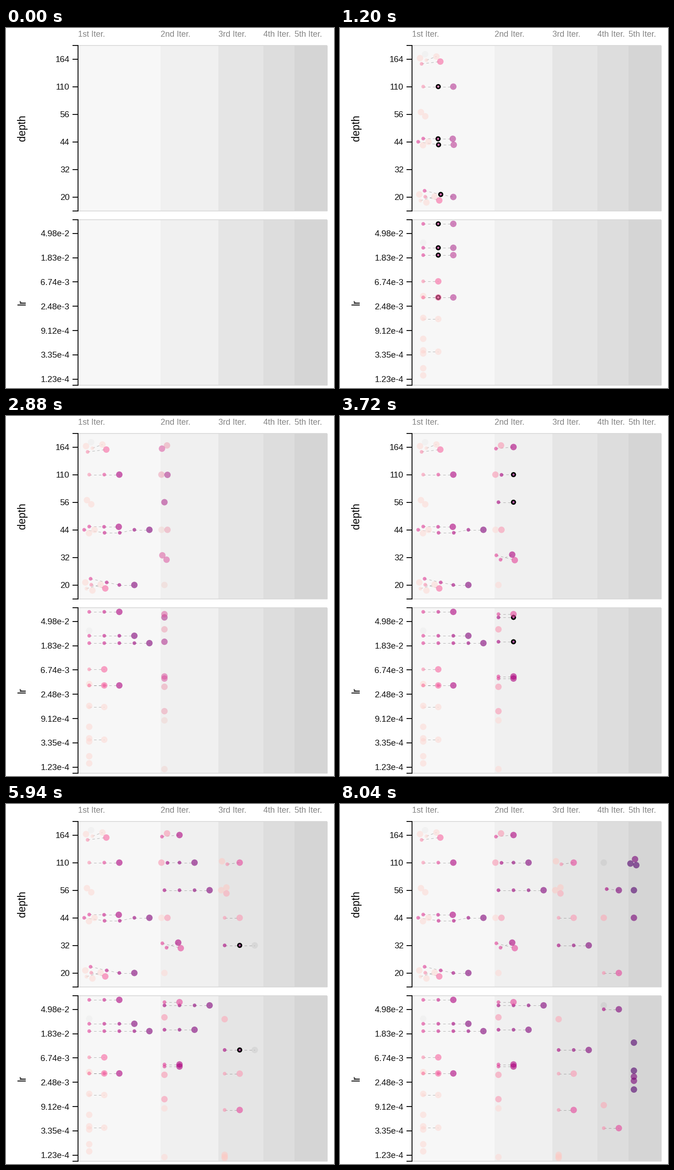
Animation, 715 px wide and 783 px high, one loop 8.22 s. Source, as a matplotlib script:

```python
import numpy as np
import matplotlib.pyplot as plt
from matplotlib.animation import FuncAnimation
from matplotlib.collections import LineCollection

W, H, DPI = 715, 783, 64
PT = 72 / DPI                      # points per pixel
STEP_MS, FRAMES = 60, 137
RUNG = 32.8                        # distance between two rungs
BIG, SMALL = 7, 4

DEPTHS = "164 110 56 44 32 20".split()
RATES = "4.98e-2 1.83e-2 6.74e-3 2.48e-3 9.12e-4 3.35e-4 1.23e-4".split()
ROW = {name: 67.5 + 60 * i for i, name in enumerate(DEPTHS)}

# Score on the first and on the last rung.
GHOST, FAINT, DIM, SOFT = (0, 0), (1.2, 1.2), (1.8, 1.8), (2.7, 2.7)
LIGHT, PALE, WARM, RISE = (3.1, 3.1), (3.3, 4), (3.3, 4.7), (3.2, 6)
ROSE, PINK, HOT = (4.7, 4.7), (4.8, 6), (4.8, 6.9)
PLUM, GRAPE, DARK = (6.1, 6.9), (7, 7), (7.8, 7.8)

cmap = plt.get_cmap("RdPu")
dots, links = [], []


def ease(u):
    u = min(max(u, 0), 1)
    return 4 * u**3 if u < .5 else 1 - 4 * (1 - u)**3


def iteration(base, *times):
    """Return a function that adds one trial to both panels."""
    late = base > 400
    grey = np.array([.67, .67, .67, .22 if late else .08])

    def shade(level):
        return np.array(cmap(level / 8)[:3] + (.6,)) if level else grey

    def chain(points, levels):
        for k, (pos, level) in enumerate(zip(points, levels)):
            after = times[k + 1] if k + 1 < len(points) else None
            dots.append((pos, times[k], after, grey, shade(level)))
            if k:
                links.append((points[k - 1], pos, times[k]))

    def trial(depth, tone, rungs, rate_y, *shifts):
        levels = np.linspace(*tone, rungs)
        xs = base + RUNG * np.arange(rungs)
        shifts += ((0, 0),) * (rungs - len(shifts))
        chain([(x + dx, ROW[depth] + dy) for x, (dx, dy) in zip(xs, shifts)],
              levels)
        chain([(x, rate_y) for x in xs], levels)

    return trial


add = iteration(181.4, 120, 600, 1080, 1680, 2160)
add("164", FAINT, 1, 583, (-7, -2))
add("164", GHOST, 1, 467, (4, -10.5))
add("164", FAINT, 2, 633, (7, 2.5), (-4, -5.5))
add("164", PALE, 2, 551, (-3.5, 10.5), (4.5, 5.5))
add("110", RISE, 3, 586)
add("56", FAINT, 1, 630.5, (-5, -4.5))
add("56", FAINT, 1, 676, (4.5, 4.5))
add("44", PINK, 3, 426, (0, -7), (-.4, -6.5), (-1.2, -6.5))
add("44", HOT, 5, 494, (-11, 0), (.6, 6.5), (1, 6.5))
add("44", FAINT, 1, 701, (11.5, 0))
add("44", FAINT, 1, 708, (-.5, 7.5))
add("20", HOT, 4, 478, (3, -13.5), (5.4, -5.5))
add("20", FAINT, 1, 740, (-8.5, -5.5))
add("20", FAINT, 2, 704, (-6, 8), (-8, -1))
add("20", PALE, 2, 586, (4.5, -.5), (2.2, 7.5))
add("20", FAINT, 1, 755.5, (7, 12))

add = iteration(345.4, 2760, 3240, 3840, 4380)
add("164", LIGHT, 1, 464, (5.6, -3.5))
add("164", PINK, 2, 566.5, (-5.4, 3.5))
add("110", LIGHT, 1, 589, (-6.6, 0))
add("110", PLUM, 3, 491, (6.6, .5))
add("56", PLUM, 4, 438)
add("44", FAINT, 1, 662, (-6.4, 0))
add("44", LIGHT, 1, 642, (6.6, 0))
add("32", ROSE, 2, 431, (-4.6, -4.5), (2.8, 6))
add("32", PINK, 2, 571, (4.6, 5), (-2.8, -6))
add("20", FAINT, 1, 768)

add = iteration(476.6, 4920, 5400, 5940)
add("110", DIM, 1, 763, (-5.8, -3))
add("110", WARM, 2, 665.5, (5.8, 3.5))
add("56", DIM, 1, 767, (4, -6))
add("56", DIM, 1, 770, (-7.5, 0))
add("56", SOFT, 1, 468, (4, 7))
add("44", LIGHT, 2, 586.5)
add("32", PLUM, 3, 535)

add = iteration(575, 6540, 7080)
add("110", GHOST, 1, 438)
add("56", PLUM, 2, 446.5, (6.4, -2.5))
add("44", SOFT, 1, 655)
add("20", WARM, 2, 705)

add = iteration(640.7, 7620)
add("110", GRAPE, 1, 593, (2.4, -7.5))
add("110", DARK, 1, 519, (-7.6, 2))
add("110", DARK, 1, 580, (5.2, 5.5))
add("56", DARK, 1, 621)
add("44", GRAPE, 1, 602)

plt.rcParams["font.family"] = "Liberation Sans"
fig = plt.figure(figsize=(W / DPI, H / DPI), dpi=DPI, facecolor="white")
ax = fig.add_axes([0, 0, 1, 1])
ax.set(xlim=(0, W), ylim=(H, 0))
ax.axis("off")

EDGES = [157, 337, 463, 561, 629, 700]


def line(xs, ys, color, width):
    ax.plot(xs, ys, color=color, lw=width * PT, zorder=2,
            solid_capstyle="butt")


def text(x, y, s, size, **kw):
    ax.text(x, y, s, fontsize=size * PT, va="baseline", **kw)


def panel(top, bottom, ticks, title):
    for x0, x1, g in zip(EDGES, EDGES[1:], (247, 240, 229, 221, 213)):
        ax.fill_between([x0, x1], top, bottom, color=[g / 255] * 3, lw=0,
                        zorder=1)
    for y in (top, bottom):
        line([157, 700], [y, y], "#d6d6d6", 1.6)
    line([700, 700], [top, bottom], "#d6d6d6", 1.2)
    line([156.5, 156.5], [top - 1, bottom + 1], "#111111", 2)
    for y in [top, bottom, *ticks.values()]:
        line([144.5, 157], [y, y], "#111111", 2)
    for label, y in ticks.items():
        text(138.5, y + 6.5, label, 18.6, ha="right", color="#111111")
    text(42, (top + bottom) / 2 - .5, title, 22.8, ha="center",
         rotation=90, rotation_mode="anchor", color="black")


panel(38, 398, ROW, "depth")
panel(417, 777, {s: 446.7 + 52.85 * i for i, s in enumerate(RATES)}, "lr")
for x, name in zip(EDGES, "1st 2nd 3rd 4th 5th".split()):
    text(x, 18.7, name + " Iter.", 18, color="#858585")

link_art = LineCollection([[p, q] for p, q, _ in links], linewidths=PT,
                          linestyles=[(0, (5.5, 5))], zorder=3)
ax.add_collection(link_art)
dot_art = ax.scatter(*zip(*[d[0] for d in dots]), s=1, zorder=4)


def dot_state(t, start, after, first, last):
    """Face colour, radius and ring strength of a dot at time t."""
    if t < start:
        return np.zeros(4), 0, 0
    face = first + (last - first) * ease((t - start) / 180)
    if after is None:
        return face, BIG, 0
    chosen = ease((t - after + 300) / 120)
    ring = chosen * (1 - ease((t - after - 120) / 120))
    return face, BIG + (SMALL - BIG) * chosen, ring


def draw(i):
    t = i * STEP_MS
    faces, radii, rings = zip(*[dot_state(t, *d[1:]) for d in dots])
    dot_art.set_facecolor(np.array(faces))
    dot_art.set_edgecolor([(0, 0, 0, r) for r in rings])
    dot_art.set_linewidth([3.1 * PT * (r > 0) for r in rings])
    dot_art.set_sizes((2 * PT * np.array(radii))**2, DPI)
    link_art.set_color([(0, 0, 0, .27 * (t >= start))
                        for _, _, start in links])
    return dot_art, link_art


anim = FuncAnimation(fig, draw, frames=FRAMES, interval=STEP_MS,
                     repeat=True, repeat_delay=0)
plt.show()
```
